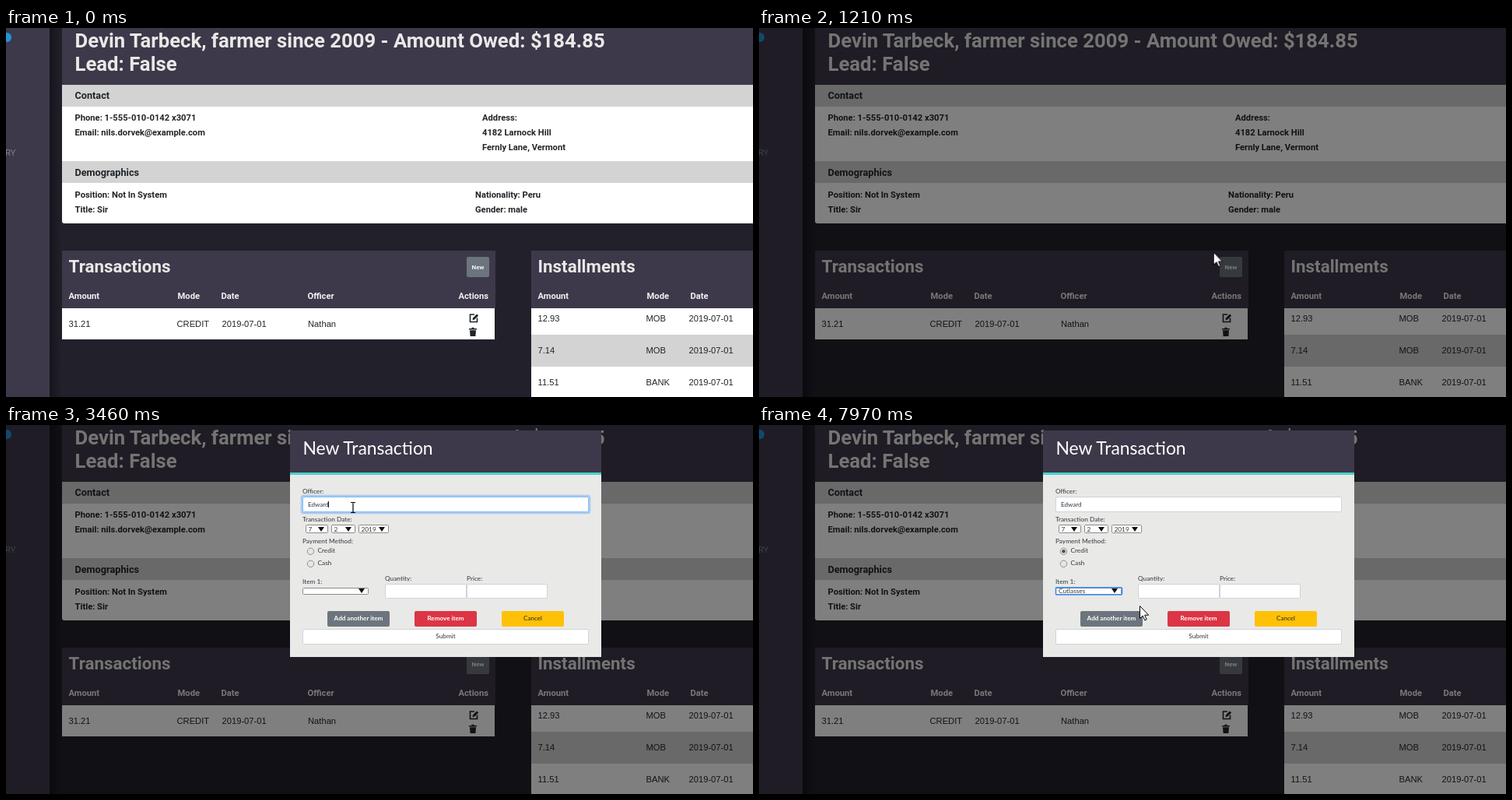
An HTML page for the animation above (8 s loop, 960 by 474 pixels).

```html
<!DOCTYPE html>
<html lang="en">
<head>
<meta charset="utf-8">
<title>New transaction</title>
<style>
  html, body { margin: 0; width: 100%; height: 100%; overflow: hidden; background: #22202a; }
  svg { display: block; }
  text { white-space: pre; }
  .title, .h2, .h5, .bold, .tiny { font-family: Roboto, sans-serif; font-weight: 700; fill: #212529; }
  .title { font-size: 25.7px; fill: #e9e9e7; }
  .h2 { font-size: 22.4px; fill: #e9e9e7; }
  .h5 { font-size: 12.7px; }
  .bold { font-size: 11.2px; }
  .tiny { font-size: 8px; }
  .light { fill: #f2f2f2; }
  .nav { font: 300 11px Roboto, sans-serif; fill: #a19eab; }
  .cell { font: 11.2px "Liberation Sans", Arial, sans-serif; fill: #212529; }
  .form, .btn, .head { font-family: Lato, sans-serif; }
  .form { font-size: 8.3px; fill: #33363a; }
  .btn { font-size: 8.1px; font-weight: 700; text-anchor: middle; }
  .head { font-size: 22.9px; fill: #fff; }
  .mid { text-anchor: middle; }
  .white { fill: #fff; }
</style>
</head>
<body>
<svg id="stage" width="960" height="474" viewBox="0 0 960 474"></svg>
<script>
const LOOP = 8000;
const PURPLE = '#3e394a', GREY = '#d3d3d3', BLUE = '#1e90ff', SLATE = '#6c757d';
const OFFICER = 'Edward';
const ITEMS = ['Select item ...', 'Atrazine', 'Cutlasses', 'Fertilizer', 'Knapsack', 'Zorvek', 'Maize Seed', 'NPK'];

const text = (x, y, cls, str, extra = '') => `<text x="${x}" y="${y}" class="${cls}" ${extra}>${str}</text>`;
const rect = (x, y, w, h, fill, extra = '') => `<rect x="${x}" y="${y}" width="${w}" height="${h}" fill="${fill}" ${extra}/>`;
const group = (id, ...parts) => `<g id="${id}">${parts.join('')}</g>`;
const row = (y, cls, cells) => cells.map(([x, str]) => text(x, y, cls, str)).join('');
const box = (x, y, w, h, stroke = '#ced4da', rx = 1.5) =>
  rect(x + .5, y + .5, w - 1, h - 1, '#fff', `stroke="${stroke}" rx="${rx}"`);
const arrow = (x, y) => `<path d="M${x} ${y}h8l-4 6z" fill="#111"/>`;
const select = (x, w, str) => box(x, 128, w, 11, '#8a8a8a', 1) + text(x + 3.5, 136.5, 'form', str) + arrow(x + w - 13, 131);
const radio = (y, id, label) =>
  `<circle cx="391.5" cy="${y}" r="4.2" fill="#e6e6e6" stroke="#8f8f8f"/>` +
  `<circle id="${id}" cx="391.5" cy="${y}" r="2.3" fill="#505050"/>` + text(400.5, y + 1.8, 'form', label);
const button = (x, fill, label, color) => rect(x, 239, 80, 20, fill, 'rx="2"') + text(x + 40, 251.3, 'btn', label, `fill="${color}"`);

const icons = `
  <path d="M602 368h-5.5v9.5h9v-5" fill="none" stroke="#212529" stroke-width="1.6"/>
  <path d="M599.5 375.2l.5-2.8 5-5 2.2 2.2-5 5z" fill="#212529"/>
  <path d="M595 386h3l.8-1.2h2.4l.8 1.2h3v1.4h-10zM596 388.2h8l-.6 7.8h-6.8z" fill="#212529"/>`;

const page = group('page',
  rect(0, 0, 960, 474, '#22202a'),
  rect(56, 0, 16, 474, 'url(#shade)'),
  rect(0, 0, 56, 474, PURPLE),
  '<circle cx="1" cy="12" r="6" fill="#2196d8"/>',
  text(-1, 164, 'nav', 'RY'),

  rect(72, 0, 888, 73, PURPLE),
  rect(72, 198, 900, 53, '#fff', 'rx="3"'),
  rect(72, 101, 888, 130, '#fff'),
  rect(72, 73, 888, 28, GREY),
  rect(72, 171, 888, 28, GREY),
  text(88.5, 25, 'title', 'Devin Tarbeck, farmer since 2009 - Amount Owed: $184.85'),
  text(88.5, 55, 'title', 'Lead: False'),
  text(88.5, 91, 'h5', 'Contact'),
  text(88.5, 190, 'h5', 'Demographics'),
  row(119, 'bold', [[88.5, 'Phone: 1-555-010-0142 x3071'], [612, 'Address:']]),
  row(138, 'bold', [[88.5, 'Email: nils.dorvek@example.com'], [612, '4182 Larnock Hill']]),
  row(157, 'bold', [[612, 'Fernly Lane, Vermont']]),
  row(218, 'bold', [[88.5, 'Position: Not In System'], [603, 'Nationality: Peru']]),
  row(237, 'bold', [[88.5, 'Title: Sir'], [603, 'Gender: male']]),

  rect(72, 286, 557, 74, PURPLE),
  rect(72, 360, 556, 40, '#fff'),
  text(80.5, 314, 'h2', 'Transactions'),
  rect(592, 294, 29, 26, SLATE, 'rx="2"'),
  text(606.5, 310, 'tiny light mid', 'New'),
  row(348, 'bold light', [[80.5, 'Amount'], [220.5, 'Mode'], [276.5, 'Date'], [387.5, 'Officer'], [581.5, 'Actions']]),
  row(384, 'cell', [[80.5, '31.21'], [219.5, 'CREDIT'], [277.5, '2019-07-01'], [388, 'Nathan']]),
  icons,

  rect(675, 286, 285, 74, PURPLE),
  rect(675, 360, 285, 114, '#fff'),
  rect(675, 394, 285, 41, GREY),
  text(683.5, 314, 'h2', 'Installments'),
  row(348, 'bold light', [[683.5, 'Amount'], [823.5, 'Mode'], [879.5, 'Date']]),
  [['12.93', 'MOB'], ['7.14', 'MOB'], ['11.51', 'BANK']].map(([amount, mode], i) =>
    row(377 + 41 * i, 'cell', [[683.5, amount], [822.5, mode], [877.5, '2019-07-01']])).join(''));

const modal = group('modal',
  rect(365, 7, 400, 291, '#e9e9e7'),
  rect(365, 7, 400, 54, PURPLE),
  rect(365, 61, 400, 3, '#48d1cc'),
  text(381.5, 38, 'head', 'New Transaction'),
  text(381, 88, 'form', 'Officer:'),
  box(381, 92, 368, 20),
  group('glow',
    rect(379.8, 90.8, 370.4, 22.4, 'none', 'stroke="#007bff" stroke-opacity=".28" stroke-width="2.2" rx="2.5"'),
    box(381, 92, 368, 20, '#80bdff')),
  [...OFFICER].map((_, i) => text(388, 104.5, 'form typed', OFFICER.slice(0, i + 1), 'style="font-size:8px"')).join(''),
  rect(388, 98, 1, 8, '#222', 'id="caret"'),
  text(381, 124, 'form', 'Transaction Date:'),
  select(385, 29, '7'), select(418, 31, '2'), select(453, 39, '2019'),
  text(381, 152, 'form', 'Payment Method:'),
  radio(162.3, 'credit', 'Credit'),
  radio(178.3, 'cash', 'Cash'),
  text(381, 204, 'form', 'Item 1:'),
  box(381, 209, 85, 9, '#8a8a8a', 1),
  rect(381.5, 208.8, 85, 9.2, 'none', 'id="ring" stroke="#3f8cf0" stroke-width="1.6" rx="1"'),
  text(385, 216, 'form', ITEMS[0], 'id="unpicked"'),
  text(385, 216, 'form', ITEMS[2], 'id="picked"'),
  arrow(453, 210),
  text(487, 200, 'form', 'Quantity:'), box(487, 204, 105, 19),
  text(592, 200, 'form', 'Price:'), box(592, 204, 104, 19),
  button(413, SLATE, 'Add another item', '#fff'),
  button(525, '#dc3545', 'Remove item', '#fff'),
  button(637, '#ffc107', 'Cancel', '#212529').replace('class="btn"', 'class="btn" style="font-weight:400"'),
  box(381, 262, 368, 20),
  text(565, 274.3, 'form mid', 'Submit'));

const itemText = (i, cls) => text(386, 238 + 32 * i, 'form ' + cls, ITEMS[i]);
const menu = group('menu',
  rect(382.5, 219.5, 83, 270, '#fff', `stroke="${BLUE}"`),
  ITEMS.map((_, i) => itemText(i, '')).join(''),
  [0, 1, 2].map(i => group('hover' + i, rect(383, 220 + 32 * i, 82, 32, BLUE), itemText(i, 'white'))).join(''));

const cursor = group('cursor',
  '<path id="pointer" d="M.5 .5v16l3.7-3.4 2.6 5.7 2.4-1-2.5-5.6h5z" fill="#fff" stroke="#000"/>',
  '<path id="beam" d="M-3 -6.5h2.5l.5 .5 .5-.5h2.5M0 -6v12M-3 6.5h2.5l.5-.5 .5 .5h2.5" fill="none" stroke="#000" stroke-width="1.2"/>');

document.getElementById('stage').innerHTML =
  `<defs><linearGradient id="shade"><stop stop-color="#16141b"/><stop offset="1" stop-color="#22202a"/></linearGradient></defs>` +
  page + rect(0, 0, 960, 474, '#000', 'id="backdrop"') + modal + menu + cursor;

const $ = id => document.getElementById(id);

// Steps are [time, properties]; the first and last poses are held to the loop ends.
function play(el, steps) {
  const all = [[0, steps[0][1]], ...steps, [LOOP, steps[steps.length - 1][1]]];
  el.animate(all.map(([t, props]) => ({ offset: t / LOOP, ...props })), { duration: LOOP, iterations: Infinity });
}
const jump = (t, props) => [t, { ...props, easing: 'step-end' }];
// Hidden at first, toggled at each given time.
const show = (el, ...times) =>
  play(el, [jump(0, { opacity: 0 }), ...times.map((t, i) => jump(t, { opacity: 1 - i % 2 }))]);
const fade = (el, ...points) => play(el, points.map(([t, opacity]) => [t, { opacity }]));

fade($('backdrop'), [1065, 0], [1205, .5]);
play($('modal'), [
  [1230, { opacity: 0, transform: 'translate(0px, -35px)', easing: 'ease-out' }],
  [1560, { opacity: 1, transform: 'translate(0px, 0px)' }]]);
fade($('glow'), [2140, 0], [2290, 1], [5500, 1], [5640, 0]);

const typedAt = [2990, 3160, 3220, 3390, 3440, 3460];
const typed = [...document.querySelectorAll('.typed')];
typed.forEach((el, i) => show(el, typedAt[i], typedAt[i + 1] || LOOP));
play($('caret'), [jump(0, { transform: 'translate(0px)' }), ...typed.map((el, i) =>
  jump(typedAt[i], { transform: `translate(${Math.round(el.getComputedTextLength())}px)` }))]);
show($('caret'), 2160, 2690, 2990, 4010, 4550, 5080);

show($('cash'), 0, 5500);
show($('credit'), 5500);
show($('ring'), 6490);
show($('menu'), 6490, 7580);
show($('hover0'), 6490, 6880);
show($('hover1'), 6880, 7090);
show($('hover2'), 7090, 7580);
show($('unpicked'), 0, 7580);
show($('picked'), 7580);

show($('pointer'), 70, 1900, 4550);
show($('beam'), 1900, 4550);
play($('cursor'), [
  [70, 750, 412], [260, 655, 347], [450, 597, 310], [830, 597, 310], [1060, 594, 309],
  [1210, 584, 288], [1600, 480, 162], [1900, 449, 112], [2060, 446, 106], [4310, 446, 106],
  [4400, 445, 102], [4540, 445, 102], [4560, 447, 150], [4710, 451, 238], [4870, 450, 243],
  [5060, 415, 196], [5260, 394, 172], [5430, 391, 161], [5650, 391, 162], [5720, 407, 180],
  [5800, 425, 199], [6020, 425, 199], [6260, 425, 212], [6700, 425, 212], [6800, 426, 236],
  [7120, 423, 292], [7600, 423, 292], [7780, 456, 262], [7970, 489, 232]
].map(([t, x, y]) => [t, { transform: `translate(${x}px, ${y}px)` }]));
</script>
</body>
</html>
```
